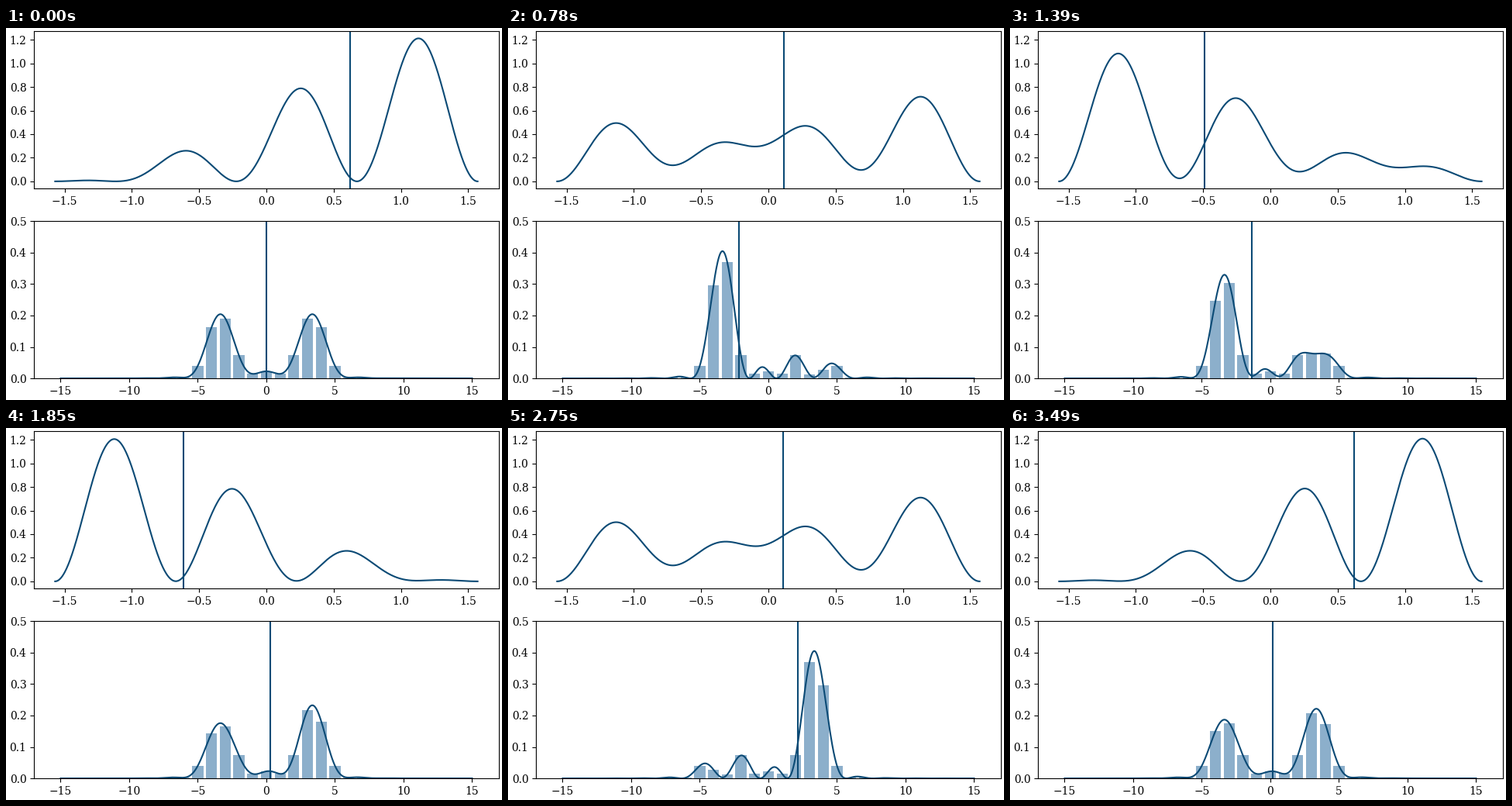
Animation, 640 px wide and 480 px high, one loop 3540 ms. Source, as a matplotlib script:

```python
import math

import matplotlib.pyplot as plt
import numpy as np
from matplotlib.animation import FuncAnimation

W, H, DPI = 640, 480, 100
LOOP_MS, TICK_MS, STEP_MS = 3540, 20, 41
LAST_STEP = 85
LINE, BAR = "#0b4a75", "#8cafcb"

plt.rcParams["font.family"] = "DejaVu Serif"

# Particle in a box of width pi: equal mix of the levels 3 and 4
LEVELS = {3: 1 / math.sqrt(2), 4: -1 / math.sqrt(2)}
x = np.linspace(-math.pi / 2, math.pi / 2, 1001)
p = np.linspace(-15, 15, 601)
p_int = np.arange(-15, 16)
X_AMP = 96 / (49 * math.pi)
OMEGA = (4**2 - 3**2) / 2


def level(n):
    return math.sqrt(2 / math.pi) * np.sin(n * (x + math.pi / 2))


def to_momentum(f, k):
    kernel = np.exp(-1j * np.outer(k, x))
    return kernel @ f * (x[1] - x[0]) / math.sqrt(2 * math.pi)


def basis(transform):
    return {n: transform(level(n)) for n in LEVELS}


pos_basis = basis(lambda f: f)
mom_basis = basis(lambda f: to_momentum(f, p))
int_basis = basis(lambda f: to_momentum(f, p_int))


def density(parts, t):
    psi = sum(c * np.exp(-0.5j * n * n * t) * parts[n] for n, c in LEVELS.items())
    return np.abs(psi) ** 2


fig = plt.figure(figsize=(W / DPI, H / DPI), dpi=DPI)


def panel(top, bottom, left=36.1, right=635.83):
    return fig.add_axes([left / W, 1 - bottom / H, (right - left) / W, (bottom - top) / H])


pos_ax = panel(4.17, 207.1)
mom_ax = panel(249.2, 452.1)

start = density(pos_basis, 0)
peak = start.max()
pos_ax.set_xlim(-0.55 * math.pi, 0.55 * math.pi)
pos_ax.set_ylim(-0.05 * peak, 1.05 * peak)
mom_ax.set_xlim(-16.94, 16.94)
mom_ax.set_ylim(0, 0.5)

pos_curve, = pos_ax.plot(x, start, color=LINE)
pos_mean = pos_ax.axvline(X_AMP, color=LINE)
bars = mom_ax.bar(p_int, density(int_basis, 0), width=0.8, color=BAR)
mom_curve, = mom_ax.plot(p, density(mom_basis, 0), color=LINE)
mom_mean = mom_ax.axvline(0, color=LINE)


def update(i):
    # The picture steps every 41 ms, rounded to 10 ms; time runs at 48 steps per unit
    ms = i * TICK_MS + TICK_MS / 2
    step = min(math.ceil((ms + 5) / STEP_MS) - 1, LAST_STEP)
    t = step / 48

    pos_curve.set_ydata(density(pos_basis, t))
    mom_curve.set_ydata(density(mom_basis, t))
    for bar, h in zip(bars, density(int_basis, t)):
        bar.set_height(h)

    pos_mean.set_xdata([X_AMP * math.cos(OMEGA * t)] * 2)
    mom_mean.set_xdata([-X_AMP * OMEGA * math.sin(OMEGA * t)] * 2)
    return pos_curve, pos_mean, mom_curve, mom_mean, *bars


anim = FuncAnimation(fig, update, frames=LOOP_MS // TICK_MS, interval=TICK_MS,
                     repeat=True, repeat_delay=0, blit=False)
plt.show()
```
